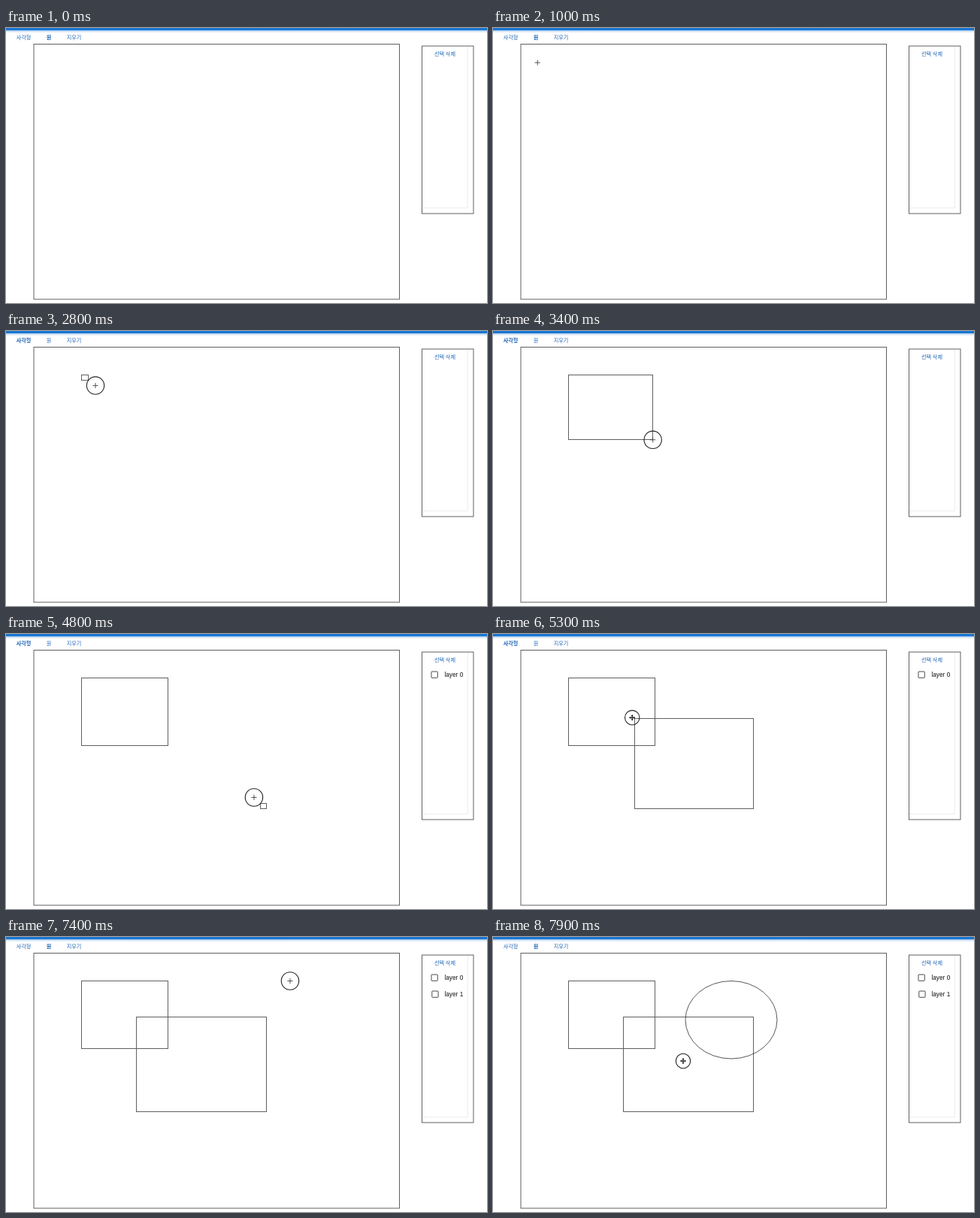
Recreate the animation shown at these times as an HTML page with a canvas. Size 640 px wide and 366 px high, loop 8000 ms.

```html
<!DOCTYPE html>
<html lang="ko">
<head>
<meta charset="utf-8">
<title>도형 그리기</title>
<style>
html, body { margin: 0; width: 100%; height: 100%; overflow: hidden; background: #fff; }
canvas { display: block; width: 640px; height: 366px; }
</style>
</head>
<body>
<canvas id="stage"></canvas>
<script>
const W = 640, H = 366, LOOP = 8000, STEP = 100, ENTER = 200;
const LINE = '#606060', BLUE = '#1f66b5';
const KOREAN = '"Noto Sans CJK KR", "Noto Sans CJK", "Noto Sans CJK JP", sans-serif';
const LATIN = '"Liberation Sans", Arial, sans-serif';
const stage = document.getElementById('stage');
const c = stage.getContext('2d');
const scale = window.devicePixelRatio || 1;
stage.width = W * scale;
stage.height = H * scale;

const stop = (arrive, leave, x, y) => ({ arrive, leave, x, y, rests: leave > arrive });
const stops = [
  stop(0, ENTER, 311, 357),
  stop(1200, 1300, 30, 10),
  stop(2000, 2200, 25, 13.5),
  stop(2700, 2700, 100.5, 58.5),
  stop(3300, 3300, 211.5, 143.2),
  stop(3600, 3800, 215, 148),
  stop(4500, 4700, 346.5, 232.5),
  stop(4800, 4800, 330, 217.5),
  stop(5200, 5200, 191, 114),
  stop(5500, 5700, 173.6, 106),
  stop(6400, 6700, 57.5, 5),
  stop(7400, 7400, 378, 58.5),
  stop(7800, 7800, 259, 159),
  stop(7900, LOOP, 253, 165)
];

const shapes = [
  { kind: 'rect', press: 2700, release: 3800 },
  { kind: 'rect', press: 4700, release: 5700 },
  { kind: 'ellipse', press: 7400, release: LOOP }
];
const clicks = [{ at: 2100, button: 0 }, { at: 6600, button: 1 }];
const buttons = ['사각형', '원', '지우기'].map((text, i) => {
  const x = 23.5 + i * 33.5;
  return { text, x, box: { x0: x - 16, y0: 3, x1: x + 16, y1: 21 } };
});

const smooth = k => k * k * (3 - 2 * k);

// travel between two rests is eased, a drag runs straight through
function pointerAt(t) {
  const i = stops.findIndex(s => t <= s.leave);
  const b = stops[i];
  if (t >= b.arrive) return b;
  const a = stops[i - 1];
  const u = (t - a.leave) / (b.arrive - a.leave);
  const k = a.rests && b.rests ? smooth(u) : u;
  return { x: a.x + (b.x - a.x) * k, y: a.y + (b.y - a.y) * k };
}

// the dragged corner trails the pointer slightly
function bounds(shape, t) {
  const a = pointerAt(shape.press);
  const b = pointerAt(Math.max(shape.press, Math.min(t, shape.release) - 50));
  return {
    x0: Math.min(a.x, b.x), y0: Math.min(a.y, b.y),
    x1: Math.max(a.x, b.x), y1: Math.max(a.y, b.y)
  };
}

const inside = (p, r) => p.x >= r.x0 && p.x <= r.x1 && p.y >= r.y0 && p.y <= r.y1;
const snap = v => Math.floor(v) + 0.5;

function frame(x0, y0, x1, y1) {
  c.strokeStyle = LINE;
  c.lineWidth = 1;
  c.strokeRect(x0, y0, x1 - x0, y1 - y0);
}

function label(text, x, y, font, color, align = 'center') {
  c.font = font;
  c.fillStyle = color;
  c.textAlign = align;
  c.fillText(text, x, y);
}

function drawPage() {
  c.fillStyle = '#fff';
  c.fillRect(0, 0, W, H);
  const shade = c.createLinearGradient(0, 3, 0, 7);
  shade.addColorStop(0, 'rgba(60,140,220,.55)');
  shade.addColorStop(0.5, 'rgba(110,165,220,.2)');
  shade.addColorStop(1, 'rgba(150,190,230,0)');
  c.fillStyle = shade;
  c.fillRect(0, 3, W, 4);
  c.fillStyle = '#1976d2';
  c.fillRect(0, 0, W, 3);
  frame(37, 21.5, 523.5, 361);
  c.strokeStyle = '#ededed';
  c.beginPath();
  c.moveTo(614.5, 24);
  c.lineTo(614.5, 239.5);
  c.lineTo(554, 239.5);
  c.stroke();
  frame(553.5, 24, 622, 247);
  label('선택 삭제', 584, 36.5, '400 7.2px ' + KOREAN, BLUE);
}

function drawButtons(t) {
  const done = clicks.filter(k => t > k.at);
  const active = done.length ? done[done.length - 1].button : 1;
  const hover = pointerAt(Math.max(0, t - 200));
  buttons.forEach(({ text, x, box }, i) => {
    c.save();
    c.beginPath();
    c.rect(box.x0, box.y0, 32, 18);
    c.clip();
    if (inside(hover, box)) {
      c.fillStyle = 'rgba(25,118,210,.04)';
      c.fillRect(box.x0, box.y0, 32, 18);
    }
    for (const k of clicks) {
      const age = (t - k.at) / 300;
      if (k.button !== i || age < 0 || age > 1) continue;
      c.fillStyle = `rgba(25,118,210,${0.18 * (1 - age)})`;
      c.beginPath();
      c.arc(x, 12, 5 + 15 * age, 0, 7);
      c.fill();
    }
    c.restore();
    label(text, x, 14.6, `${i === active ? 700 : 400} 7.1px ${KOREAN}`, BLUE);
  });
}

function drawShape(shape, t) {
  const b = bounds(shape, t);
  if (shape.kind === 'rect') {
    frame(snap(b.x0), snap(b.y0), snap(b.x1), snap(b.y1));
    return;
  }
  c.strokeStyle = '#444';
  c.lineWidth = 0.9;
  c.beginPath();
  c.ellipse((b.x0 + b.x1) / 2, (b.y0 + b.y1) / 2, (b.x1 - b.x0) / 2, (b.y1 - b.y0) / 2, 0, 0, 7);
  c.stroke();
}

function drawLayer(i) {
  const x = 566 + i * 0.8, y = 50 + i * 22;
  c.strokeStyle = '#4a4a4a';
  c.lineWidth = 1;
  c.beginPath();
  c.roundRect(x, y, 8.3, 8.3, 0.6);
  c.stroke();
  label('layer ' + i, 608.3, y + 6.6, '8.3px ' + LATIN, '#111', 'right');
}

function crosshair(size) {
  c.lineWidth = 0.9;
  c.strokeStyle = '#444';
  c.beginPath();
  c.moveTo(-size, 0);
  c.lineTo(size, 0);
  c.moveTo(0, -size);
  c.lineTo(0, size);
  c.stroke();
}

function moveArrows() {
  c.fillStyle = '#111';
  for (let i = 0; i < 4; i++) {
    c.rotate(Math.PI / 2);
    c.fillRect(-0.6, -3, 1.2, 3);
    c.beginPath();
    c.moveTo(0, -4);
    c.lineTo(1.6, -2.2);
    c.lineTo(-1.6, -2.2);
    c.fill();
  }
}

function outline(d) {
  const shape = new Path2D(d);
  c.fillStyle = '#fff';
  c.strokeStyle = '#333';
  c.lineWidth = 0.8;
  c.lineJoin = 'round';
  c.fill(shape);
  c.stroke(shape);
}

const HAND = 'M-1 1Q-.6-.4.4.6L1.5 3.6Q2.2 2.6 3 3.5Q3.8 2.8 4.4 3.7Q5.4 3.2 5.6 4.6' +
  'Q5.8 7 4.8 8.2V9.4H.6Q-.5 8.2-2.4 5.9Q-2.6 4.8-1.4 5L.2 6Z';
const ARROW = 'M0 0V7.6L1.8 6L3 8.8L4.2 8.3L3 5.6H5.4Z';

function drawPointer(t) {
  const p = pointerAt(t);
  const pressed = shapes.some(s => t >= s.press && t < s.release);
  const onCanvas = inside(p, { x0: 37, y0: 22, x1: 524, y1: 361 });
  const onShape = shapes.some(s => t >= s.release && inside(p, bounds(s, t)));
  c.save();
  c.translate(p.x, p.y);
  if (pressed) {
    c.strokeStyle = '#222';
    c.lineWidth = 1.1;
    c.beginPath();
    c.arc(0, 0, onShape ? 9.7 : 11.7, 0, 7);
    c.stroke();
  }
  if (onCanvas && onShape) moveArrows();
  else if (onCanvas) crosshair(3.6);
  else outline(buttons.some(b => inside(p, b.box)) ? HAND : ARROW);
  c.restore();
}

function draw(now) {
  const t = Math.floor((now % LOOP) / STEP) * STEP;
  c.setTransform(scale, 0, 0, scale, 0, 0);
  drawPage();
  drawButtons(t);
  shapes.forEach((s, i) => {
    if (t > s.press) drawShape(s, t);
    if (t >= s.release) drawLayer(i);
  });
  if (t >= ENTER) drawPointer(t);
}

const start = performance.now();
function tick() {
  draw(performance.now() - start);
  requestAnimationFrame(tick);
}
tick();
</script>
</body>
</html>
```
